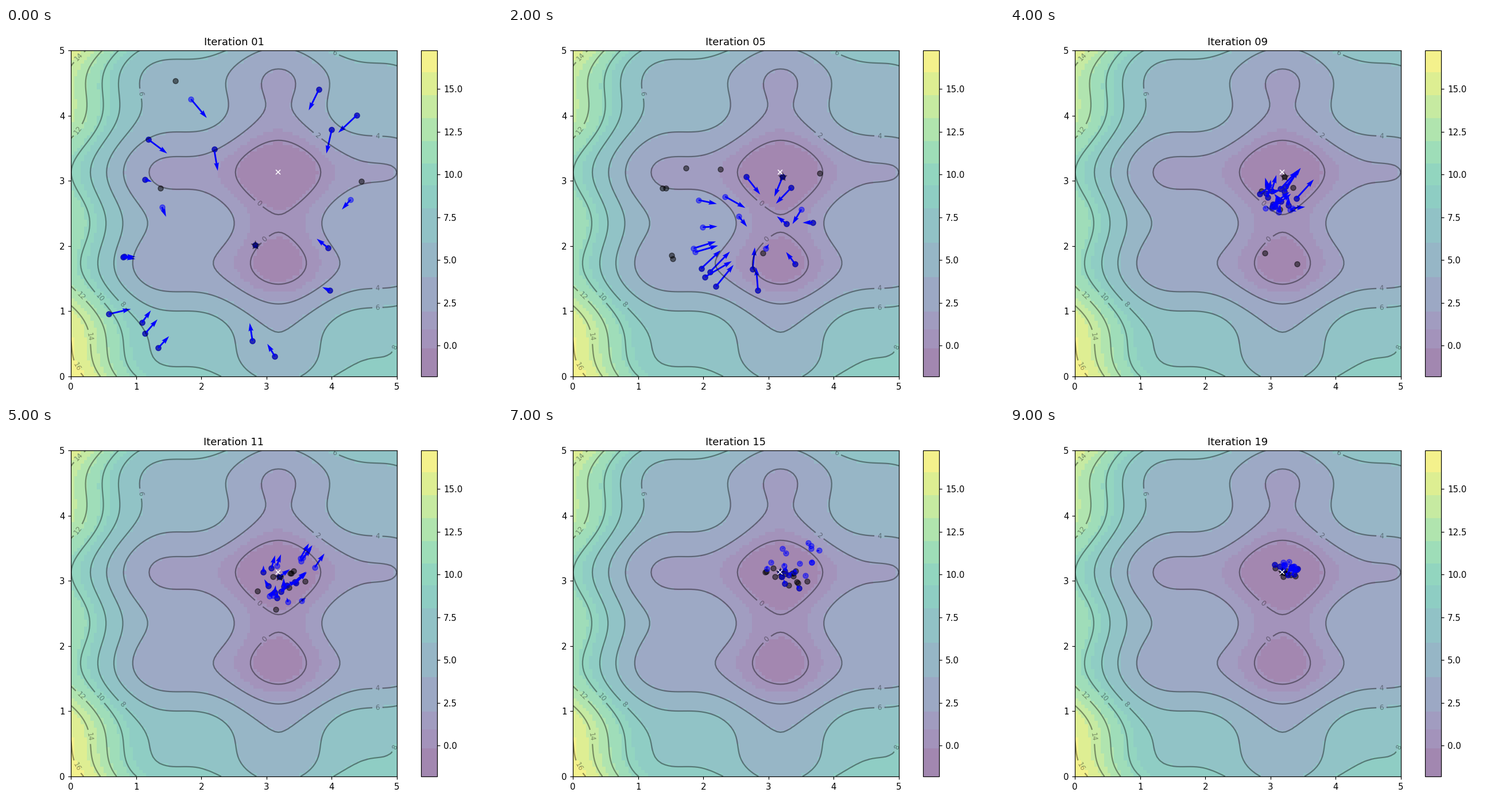
A matplotlib script that plays this animation: 864 px wide and 648 px high, repeating every 9.5 s.

```python
import numpy as np
import matplotlib.pyplot as plt
from matplotlib.animation import FuncAnimation
from matplotlib.colors import ListedColormap

STEPS = 19
W, H, DPI = 864, 648, 108
INERTIA, PULL = 0.8, 0.1


def cost(x, y):
    return ((x - 3.14) ** 2 + (y - 2.72) ** 2
            + np.sin(3 * x + 1.41) + np.sin(4 * y - 1.73))


def run_swarm(steps, count=20, seed=100):
    """Return (position, velocity, personal best, global best) per step."""
    rng = np.random.RandomState(seed)
    pos = rng.rand(2, count) * 5
    vel = rng.randn(2, count) * 0.1
    best, best_cost = pos.copy(), cost(*pos)
    history = []
    for _ in range(steps):
        lead = best[:, [best_cost.argmin()]]
        r1, r2 = rng.rand(2)
        vel = INERTIA * vel + PULL * r1 * (best - pos) + PULL * r2 * (lead - pos)
        pos = pos + vel
        now = cost(*pos)
        better = now <= best_cost
        best = np.where(better, pos, best)
        best_cost = np.minimum(now, best_cost)
        history.append((pos, vel, best, best[:, best_cost.argmin()]))
    return history


def banded_viridis(lo, hi):
    """Viridis in flat steps, finer at both ends of the value range."""
    edges = np.r_[lo, -0.2, 0.9, 2:8:2, np.linspace(8, 16, 7), hi]
    mids = (edges[1:] + edges[:-1]) / 2
    band = np.digitize(np.linspace(lo, hi, 256), edges[1:-1])
    return ListedColormap(plt.get_cmap("viridis")((mids[band] - lo) / (hi - lo)))


def add_axes(left, bottom, width, height):
    return fig.add_axes([left / W, bottom / H, width / W, height / H])


# The first step is a warm-up and is not shown.
history = run_swarm(STEPS + 1)[1:]

axis = np.linspace(0, 5, 100)
x, y = np.meshgrid(axis, axis)
z = cost(x, y)
low = z.argmin()

fig = plt.figure(figsize=(W / DPI, H / DPI), dpi=DPI)
ax = add_axes(113, 41, 568, 568)
img = ax.imshow(z, extent=[0, 5, 0, 5], origin="lower",
                cmap=banded_viridis(z.min(), z.max()), alpha=0.5)
fig.colorbar(img, cax=add_axes(723, 41, 28.4, 568))
ax.plot(x.flat[low], y.flat[low], marker="x", markersize=5, color="white")
ax.set(xlim=(0, 5), ylim=(0, 5))

contours = ax.contour(x, y, z, 10, colors="black", alpha=0.4)
label_spots = [(4.04, 4.96), (4.70, 3.69), (3.79, 3.70), (2.89, 2.66),
               (2.98, 2.10), (4.70, 1.35), (4.70, 1.06), (4.96, 0.45),
               (1.08, 4.34), (0.11, 4.91), (0.11, 3.78), (0.16, 1.24),
               (0.44, 1.21), (0.79, 1.11), (0.30, 0.61), (0.10, 0.15)]
ax.clabel(contours, inline=True, fontsize=8, fmt="%.0f", manual=label_spots)

pos, vel, best, lead = history[0]
best_dots = ax.scatter(*best, marker="o", color="black", alpha=0.5)
dots = ax.scatter(*pos, marker="o", color="blue", alpha=0.5)
arrows = ax.quiver(*pos, *vel, color="blue", width=0.005,
                   angles="xy", scale_units="xy", scale=1)
star = ax.scatter(*lead, marker="*", s=100, color="black", alpha=0.4)


def animate(i):
    pos, vel, best, lead = history[i]
    ax.set_title(f"Iteration {i + 1:02d}")
    best_dots.set_offsets(best.T)
    dots.set_offsets(pos.T)
    arrows.set_offsets(pos.T)
    arrows.set_UVC(*vel)
    star.set_offsets([lead])
    return best_dots, dots, arrows, star


anim = FuncAnimation(fig, animate, frames=STEPS, interval=500,
                     repeat=True, repeat_delay=0)
plt.show()
```
